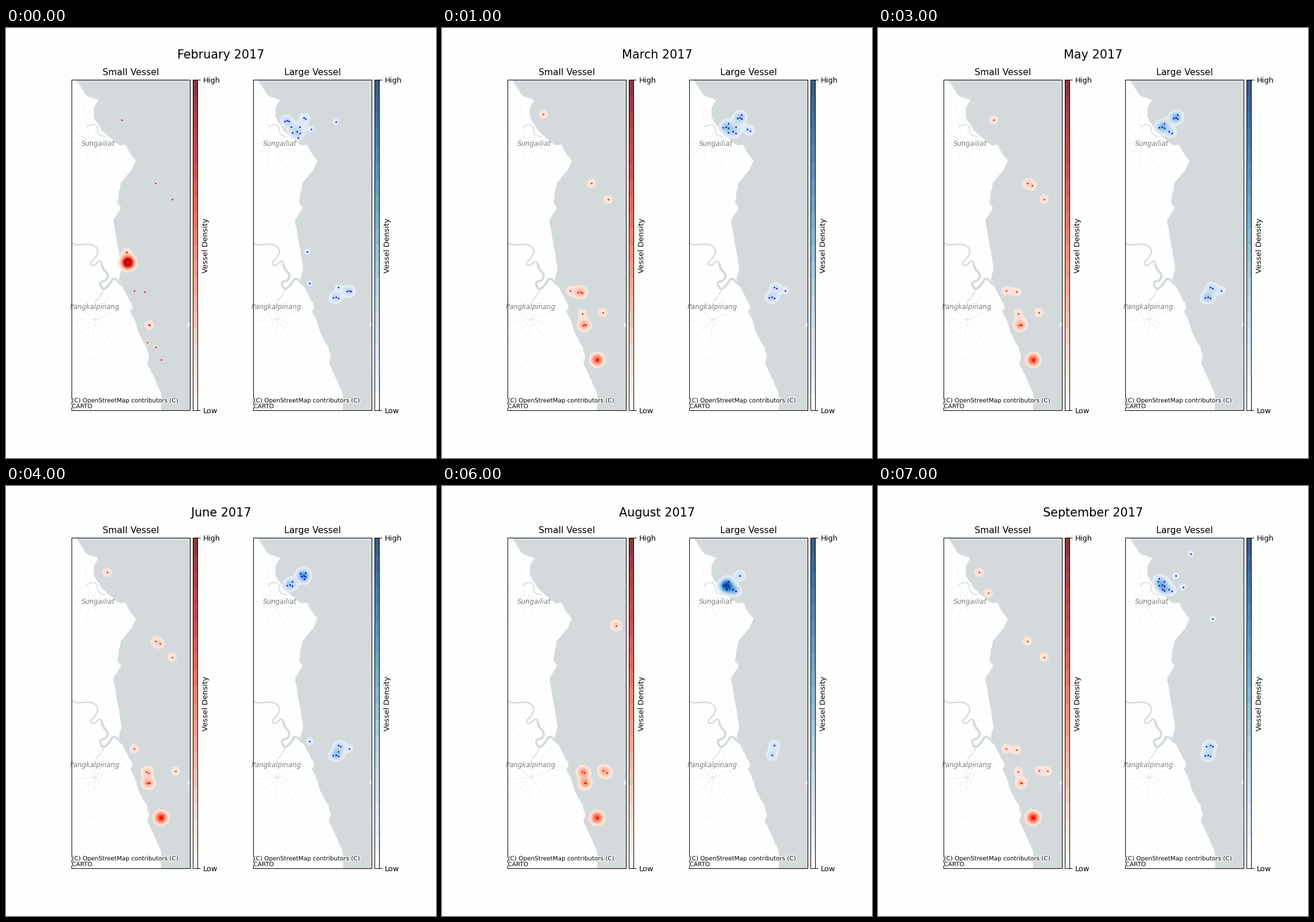
Write a matplotlib script that moves like this. It is 748 px wide and 748 px high and loops after 8 s.

```python
import numpy as np
import matplotlib.pyplot as plt
from matplotlib.animation import FuncAnimation
from matplotlib.patheffects import withStroke

SIZE, DPI = 748, 93.5
TOP, BOTTOM, LEFT, WIDTH, SHIFT = 90, 665, 114, 206, 316
PAPER, LAND, WATER, ROAD = "#fefefd", "#fefefe", "#d4dadc", "#e3e7e8"
BANDS = 20
KERNEL = 87.8  # twice the squared bandwidth, in px

COAST = [
    (121, 90), (140, 118), (161, 125), (152, 140), (153, 156), (168, 179),
    (188, 197), (197, 204), (208, 203), (216, 219), (226, 231), (219, 246),
    (200, 269), (195, 292), (194, 305), (200, 313), (187, 333), (189, 350),
    (194, 375), (201, 418), (196, 437), (206, 457), (221, 486), (216, 492),
    (226, 514), (232, 533), (245, 556), (249, 573), (246, 583), (256, 605),
    (270, 636), (270, 667)]
RIVER = [
    (113, 373), (122, 378), (148, 375), (161, 384), (157, 399), (145, 409),
    (152, 415), (165, 402), (168, 419), (178, 428), (175, 439), (162, 442),
    (168, 456), (179, 448), (187, 433), (200, 446)]
CREEKS = [
    [(141, 172), (150, 167), (159, 170), (160, 186), (172, 189)],
    [(156, 475), (163, 468), (170, 456)]]
TOWNS = [("Sungailiat", 160, 201, (146, 200)),
         ("Pangkalpinang", 154.7, 485, (156, 507))]

# Fishing and anchoring grounds: x, y, spacing of the vessels
SMALL = dict(
    lagoon=(176, 150, 6), spit=(192, 186, 1), cape=(201, 160, 8),
    far=(303, 243, 1), reef=(260, 270, 9), outer=(289, 298, 2),
    cove=(209, 341, 5.5), drift=(283, 357, 25), jetty=(209, 390, 1),
    port=(212, 408, 0.9), mouth=(223, 457, 1), bank=(241, 459, 3.5),
    shoal=(244, 497, 4), flat=(248, 516, 2.5), isle=(280, 495, 8),
    east=(295, 496, 1), wreck=(246, 547, 16), south=(270, 577, 0.9))
LARGE = dict(
    top=(544, 118, 1), sea=(574, 163, 1), far=(582, 231, 1),
    quay=(489, 161, 3), roads=(518, 156, 3.2), bay=(494, 172, 4),
    inner=(506, 180, 5.5), gap=(531, 176, 6), pier=(524, 389, 1),
    mouth=(528, 444, 1), upper=(578, 451, 5), anchor=(574, 468, 4),
    east=(597, 457, 3))


def chaikin(pts, rounds=3):
    """Round off the corners of an open polyline."""
    p = np.array(pts, float)
    for _ in range(rounds):
        a, b = p[:-1], p[1:]
        cut = np.stack([0.75 * a + 0.25 * b, 0.25 * a + 0.75 * b], 1)
        p = np.vstack([p[:1], cut.reshape(-1, 2), p[-1:]])
    return p


def rough(pts, amount, step, rng):
    """Resample a polyline and shake it a little."""
    p = np.array(pts, float)
    s = np.r_[0, np.cumsum(np.hypot(*np.diff(p, axis=0).T))]
    t = np.arange(0, s[-1], step)
    q = np.stack([np.interp(t, s, p[:, k]) for k in (0, 1)], 1)
    return np.vstack([q + rng.uniform(-amount, amount, q.shape), p[-1:]])


def fleet(grounds, counts):
    """Lay each ground's vessels out on a small spiral."""
    spots = []
    for name, n in counts.items():
        x, y, gap = grounds[name]
        k = np.arange(n)
        r, a = gap * np.sqrt(k), 2.4 * k - 1.9
        spots.append(np.stack([x + r * np.cos(a), y + r * np.sin(a)], 1))
    return np.vstack(spots)


def px(n):
    return n * 72 / DPI


def box(x0, x1):
    return fig.add_axes([x0 / SIZE, 1 - BOTTOM / SIZE,
                         (x1 - x0) / SIZE, (BOTTOM - TOP) / SIZE])


def draw_map(ax, dx):
    rng = np.random.default_rng(4)
    coast = rough(COAST, 0.6, 3, rng)
    land, = ax.fill(np.r_[coast[:, 0], 100, 100] + dx, np.r_[coast[:, 1], 670, 80],
                    color=LAND, lw=0, zorder=0)
    t = np.linspace(0, 2 * np.pi, 20)
    ax.fill(319.5 + dx + 3.5 * np.cos(t), 516 + 3.5 * np.sin(t),
            color=LAND, lw=0, zorder=0)

    def stroke(p, width, color=WATER, **kw):
        return ax.plot(p[:, 0] + dx, p[:, 1], color=color, lw=px(width),
                       zorder=1, **kw)[0]

    river = chaikin(RIVER)
    half = len(river) // 2
    stroke(river[:half + 1], 2.4)
    stroke(river[half:], 4)
    for creek in CREEKS:
        stroke(chaikin(creek), 1.5)

    # Roads fan out from the towns; short lanes lie scattered between
    for *_, town in TOWNS:
        for angle in np.arange(0, 2 * np.pi, 0.7) + rng.uniform(0, 0.4):
            reach = rng.uniform(25, 65)
            end = np.add(town, (reach * np.cos(angle), reach * np.sin(angle)))
            road = stroke(rough([town, end], 1.5, 5, rng), 0.8, ROAD, ls=(0, (7, 3)))
            road.set_clip_path(land)
    for lane in rng.uniform((118, 320), (186, 632), (26, 2)):
        stroke(np.array([lane, lane + (2, 1.5)]), 0.8, ROAD)


class Panel:
    def __init__(self, title, dx, cmap, dot, floor, peak):
        self.x0, self.dot = LEFT + dx, dot
        self.levels = np.linspace(floor, peak, BANDS)
        self.colors = plt.get_cmap(cmap)((np.arange(BANDS) + 0.5) / BANDS)[:, :3]
        self.ax = ax = box(self.x0, self.x0 + WIDTH)
        ax.set(xlim=(self.x0, self.x0 + WIDTH), ylim=(BOTTOM, TOP),
               xticks=[], yticks=[], facecolor=WATER)
        ax.set_title(title, fontsize=12)
        draw_map(ax, dx)
        for name, x, y, _ in TOWNS:
            ax.text(x + dx, y, name, fontsize=9, style="italic", color="#808080",
                    ha="center", va="center", zorder=5)
        ax.text(0.003, 0.003, "(C) OpenStreetMap contributors (C)\nCARTO",
                transform=ax.transAxes, fontsize=8, va="bottom", linespacing=1.0,
                zorder=5, path_effects=[withStroke(linewidth=2, foreground="w")])
        self.add_bar(dx)

    def add_bar(self, dx):
        bar = box(325.4 + dx, 333.2 + dx)
        shades = 0.8 * self.colors + 0.2
        shades[0] = 1
        bar.imshow(shades[:, None], origin="lower", aspect="auto",
                   extent=(0, 1, 0, BANDS), interpolation="nearest")
        bar.yaxis.tick_right()
        bar.set_xticks([])
        bar.set_yticks([0, BANDS], ["Low", "High"], fontsize=10)
        fig.text((347.2 + dx) / SIZE, 1 - 378 / SIZE, "Vessel Density", fontsize=10,
                 rotation=90, ha="center", va="center")

    def layer(self, spots):
        """Mean kernel density in bands, with a dot on every vessel."""
        x = np.arange(self.x0, self.x0 + WIDTH + 1)
        y = np.arange(TOP, BOTTOM + 1)
        gx = np.exp(-(x - spots[:, :1]) ** 2 / KERNEL)
        gy = np.exp(-(y - spots[:, 1:]) ** 2 / KERNEL)
        density = np.minimum(gy.T @ gx / len(spots), 0.999 * self.levels[-1])
        heat = self.ax.contourf(x, y, density, levels=self.levels,
                                colors=self.colors[1:], alpha=0.8, zorder=2)
        dots, = self.ax.plot(*spots.T, "o", color=self.dot, ms=px(2.7), mew=0,
                             zorder=3)
        return [heat, dots]


fig = plt.figure(figsize=(SIZE / DPI, SIZE / DPI), dpi=DPI, facecolor=PAPER)
small = Panel("Small Vessel", 0, "Reds", "#ff0000", 0.032, 0.5)
large = Panel("Large Vessel", SHIFT, "Blues", "#0000ff", 0.036, 0.4)
heading = fig.text(0.5, 0.951, "", fontsize=16, ha="center", va="top")
months = []


def add_month(name, small_counts, large_counts):
    months.append((name, small.layer(fleet(SMALL, small_counts))
                   + large.layer(fleet(LARGE, large_counts))))


add_month("February",
          dict(cape=1, reef=1, outer=1, jetty=2, port=20, mouth=1, bank=1,
               flat=2, wreck=2, south=1),
          dict(quay=3, roads=2, inner=6, gap=1, sea=1, pier=1, mouth=1,
               upper=1, anchor=3, east=3))
add_month("March",
          dict(lagoon=1, reef=1, outer=1, mouth=1, bank=3, shoal=1, flat=3,
               isle=1, south=5),
          dict(bay=4, roads=4, inner=4, gap=2, upper=2, anchor=3, east=1))
add_month("April",
          dict(cape=2, reef=1, outer=1, bank=4, shoal=2, flat=5, isle=1, south=7),
          dict(quay=1, bay=1, roads=4, inner=4, gap=2, upper=1, anchor=4))
add_month("May",
          dict(cape=1, reef=2, outer=1, mouth=1, bank=1, shoal=1, flat=3,
               isle=1, south=5),
          dict(bay=4, roads=4, inner=2, upper=2, anchor=3, east=1))
add_month("June",
          dict(lagoon=1, reef=2, outer=1, mouth=1, shoal=2, flat=3, east=1, south=6),
          dict(bay=4, roads=6, mouth=1, upper=2, anchor=4, east=1))
add_month("July",
          dict(reef=1, cove=2, drift=2, shoal=2, flat=2, south=1),
          dict(bay=5, roads=4, inner=1, upper=4, anchor=4))
add_month("August",
          dict(far=1, shoal=2, flat=2, isle=2, south=3),
          dict(bay=5, roads=1, inner=2, upper=1, anchor=1))
add_month("September",
          dict(lagoon=1, spit=1, reef=1, outer=1, mouth=1, bank=1, shoal=1,
               flat=2, isle=1, east=1, south=6),
          dict(top=1, roads=1, gap=1, quay=1, bay=6, inner=3, far=1, upper=3,
               anchor=3))


def update(i):
    for k, (_, artists) in enumerate(months):
        for artist in artists:
            artist.set_visible(k == i)
    heading.set_text(f"{months[i][0]} 2017")
    return []


anim = FuncAnimation(fig, update, frames=len(months), interval=1000,
                     init_func=lambda: update(0), repeat=True, repeat_delay=0)
plt.show()
```
